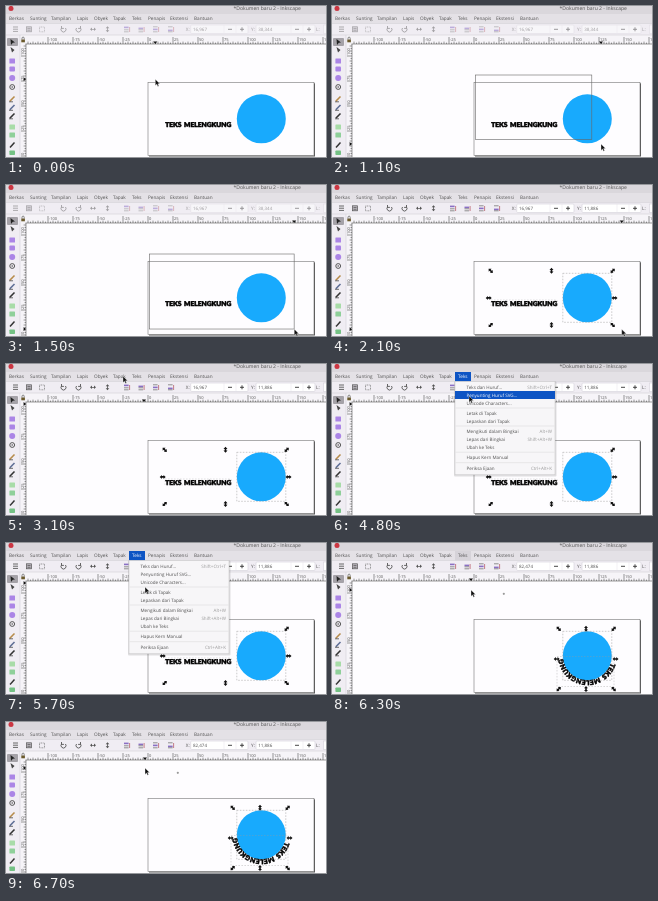
An HTML page for the animation above (7000 ms loop, 320 by 151 pixels).

```html
<!DOCTYPE html>
<html lang="id">
<head>
<meta charset="utf-8">
<title>Teks melengkung</title>
<style>
html, body { margin: 0; width: 100%; height: 100%; overflow: hidden; background: #fff; }
svg { display: block; width: 100vw; height: 100vh; }
text { font-family: "Open Sans", "Noto Sans", sans-serif; font-size: 4.7px; fill: #505050; text-rendering: geometricPrecision; white-space: pre; }
.num { font-size: 4.5px; }
.tick { font-size: 4px; fill: #555; }
.item { font-size: 4.55px; }
.key { font-size: 4.55px; fill: #999; text-anchor: end; }
.art { font-family: Lato, "Open Sans", sans-serif; font-weight: 900; font-size: 6.7px; word-spacing: .9px; fill: #000; stroke: #000; stroke-width: .5; stroke-linejoin: round; }
.dash { fill: none; stroke: #999; stroke-width: .5; stroke-dasharray: 1.6 1.4; }
</style>
</head>
<body>
<svg id="stage" viewBox="0 0 320 151" preserveAspectRatio="none"></svg>
<script>
const NS = 'http://www.w3.org/2000/svg';
const stage = document.getElementById('stage');

function add(parent, tag, attrs = {}, text) {
  const el = document.createElementNS(NS, tag);
  for (const k in attrs) el.setAttribute(k, attrs[k]);
  if (text !== undefined) el.textContent = text;
  return parent.appendChild(el);
}
const group = (parent = stage) => add(parent, 'g');
const rect = (p, x, y, width, height, fill, more) => add(p, 'rect', { x, y, width, height, fill, ...more });
const line = (p, d, stroke = '#555', w = .7, more) =>
  add(p, 'path', { d, stroke, 'stroke-width': w, fill: 'none', ...more });
const shape = (p, d, fill, more) => add(p, 'path', { d, fill, ...more });
const dot = (p, cx, cy, r, fill, more) => add(p, 'circle', { cx, cy, r, fill, ...more });
const label = (p, x, y, str, cls = '', more) => add(p, 'text', { x, y, class: cls, ...more }, str);
const show = (el, on) => el.setAttribute('visibility', on ? 'visible' : 'hidden');
const place = (el, x, y) => el.setAttribute('transform', `translate(${x} ${y})`);

const ACCENT = '#0d54c4';
const SKY = '#18aafd';
const VIOLET = '#ab85e6';

// Canvas, page and artwork
const canvas = group();
rect(canvas, 0, 0, 320, 151, '#fefdff');
rect(canvas, 143, 77.3, 166, 73.2, '#555');
rect(canvas, 142, 76.4, 166, 73.2, '#fefdff', { stroke: '#777', 'stroke-width': .6 });
dot(canvas, 255.3, 112.8, 24.5, SKY);
const flat = group(canvas);
label(flat, 159.2, 120.6, 'TEKS MELENGKUNG', 'art');
const bent = group(canvas);
add(bent, 'path', { id: 'ring', fill: 'none', d: 'M280 112.8A24.5 24.5 0 0 1 231 112.8A24.5 24.5 0 0 1 280 112.8' });
const curved = add(bent, 'text', { class: 'art' });
add(curved, 'textPath', { href: '#ring', startOffset: 7.2 }, 'TEKS MELENGKUNG');
dot(bent, 171.8, 50.8, 1.1, '#999');

function selection(x, y, r, b) {
  const g = group(canvas);
  const arrow = 'M-3 0L-.8-2V-.8H.8V-2L3 0L.8 2V.8H-.8V2Z';
  const mx = (x + r) / 2, my = (y + b) / 2;
  const handle = (hx, hy, turn) =>
    shape(g, arrow, '#111', { transform: `translate(${hx} ${hy}) rotate(${turn})` });
  for (const [hy, tilt] of [[y - 2.5, 45], [b + 2.5, -45]]) {
    handle(x - .3, hy, tilt);
    handle(mx, hy, 90);
    handle(r + .7, hy, -tilt);
  }
  handle(x - 2.3, my, 0);
  handle(r + 2.5, my, 0);
  rect(g, 230.8, 88.3, 49, 49, 'none', { class: 'dash' });
  return g;
}
const flatSel = selection(159, 88.3, 280, 137.5);
rect(flatSel, 159, 115, 66, 6, 'none', { class: 'dash', opacity: .6 });
line(flatSel, 'M192.5 116.5V120', '#333', .6);
const bentSel = selection(227, 88.3, 281, 143.6);
rect(bentSel, 225, 113.5, 57, 30, 'none', { class: 'dash', opacity: .7 });
const band = rect(canvas, 143.5, 69, 0, 0, 'none', { stroke: '#666', 'stroke-width': .6 });

// Rulers, one unit per pixel
const rulers = group();
rect(rulers, 14, 29, 306, 9, '#f6f4f8');
rect(rulers, 14, 29, 6, 122, '#f6f4f8');
line(rulers, 'M19.5 38H320M20 38V151', '#555', .6);
for (let u = -120; u <= 175; u += 2.5) {
  const x = 142 + u, major = u % 25 === 0;
  line(rulers, `M${x} ${major ? 31 : u % 5 ? 36.6 : 35.6}V38`, '#555', .6);
  if (major) label(rulers, x + 1, 35, u, 'tick');
}
for (let u = 0; u <= 110; u += 2.5) {
  const y = 150 - u, major = u % 25 === 0;
  line(rulers, `M${major ? 15 : u % 5 ? 18.6 : 17.6} ${y}H20`, '#555', .6);
  if (major) label(rulers, 0, 0, u, 'tick', { transform: `translate(18 ${y - 1}) rotate(-90)` });
}
rect(rulers, 15.3, 33.5, 3.6, 2.8, '#6b5a2c');
line(rulers, 'M16 33.5V32.2A1.1 1.1 0 0 1 18.2 32.2V33.5', '#444', .6);
const markX = shape(rulers, 'M-2 35.4H2L0 38Z', '#111');
const markY = shape(rulers, 'M17.6-2V2L20 0Z', '#111');

// Tool palette
const tools = group();
rect(tools, 0, 29, 14, 122, '#f0edf3');
line(tools, 'M14 29V151', '#d4d0d8', .6);
rect(tools, 1, 32, 11, 8, '#a5a2a8', { rx: 1 });
shape(tools, 'M4.5 33L9 36.5L6.8 36.8L5 39Z', '#222');
shape(tools, 'M4.5 41L8.5 44L6 46.5Z', '#444');
rect(tools, 3.4, 52.5, 5.6, 5, VIOLET, { rx: .5 });
rect(tools, 3.4, 60.5, 5.6, 5, VIOLET, { rx: 1 });
dot(tools, 6.2, 72, 3, VIOLET);
dot(tools, 6.2, 81, 2.4, 'none', { stroke: '#555', 'stroke-width': 1 });
dot(tools, 6.2, 81, .8, '#555');
for (const [y, tone] of [[93, '#b78b4a'], [101.5, '#5f6f96'], [110, '#333']]) {
  line(tools, `M3.8 ${y + 2.3}L8.5 ${y - 2.5}`, tone, 1.6);
  line(tools, `M3 ${y + 2.8}H7`, '#333', .7);
}
rect(tools, 3.4, 118.5, 5.6, 5, '#a8dca8', { rx: .6 });
rect(tools, 3.4, 126.5, 5.6, 5, '#8fd09a', { rx: .6 });
line(tools, 'M4 141.5L8.5 136.5', '#333', 1.5);
rect(tools, 3.4, 144.5, 5.6, 4.5, '#74c184', { rx: .8 });

// Header bars
const head = group();
rect(head, 0, 0, 320, 8, '#dad7dc');
rect(head, 0, 8, 320, 9.5, '#e4e1e6');
rect(head, 0, 17.5, 320, 11.5, '#f0edf3');
line(head, 'M0 17.5H320M0 29H320', '#d2ced6', .6);
dot(head, 5, 2.4, 2.5, '#cb3642');
label(head, 227.5, 4.2, '*Dokumen baru 2 - Inkscape', '', { style: 'font-size:5.05px' });
const hot = rect(head, 123, 8, 16, 9.5, ACCENT);
const bar = { Berkas: 3, Sunting: 24, Tampilan: 45, Lapis: 71, Obyek: 88, Tapak: 107, Teks: 126, Penapis: 142, Ekstensi: 164, Bantuan: 188 };
const entries = {};
for (const name in bar) entries[name] = label(head, bar[name], 14.2, name);

// Tool controls
const icons = group();
line(icons, 'M7 21H12M7 23.2H12M7 25.4H12', '#666', 1);
rect(icons, 20.5, 20.8, 5, 5, '#b9b5bd', { stroke: '#555', 'stroke-width': .7 });
line(icons, 'M21.5 22.5H24.5M21.5 24.3H24.5', '#555', .7);
rect(icons, 33.5, 21, 5, 4.8, 'none', { stroke: '#777', 'stroke-width': .8, 'stroke-dasharray': '.9 .7' });
line(icons, 'M55.5 22A2.5 2.5 0 1 0 59.5 22M55.5 20V22.4H57.9', '#555', .9);
line(icons, 'M74.5 22A2.5 2.5 0 1 1 70.5 22M74.5 20V22.4H72.1', '#555', .9);
const swap = 'M-3 0L-1-1.8V-.4H1V-1.8L3 0L1 1.8V.4H-1V1.8Z';
shape(icons, swap, '#555', { transform: 'translate(87 23.3)' });
shape(icons, swap, '#555', { transform: 'translate(101.5 23.3) rotate(90)' });
[121, 135.5, 150, 165].forEach((x, i) => {
  rect(icons, x - 3, 20.6 + i, 4.6, 1.6, '#8a6fc4');
  line(icons, `M${x - 3} 25.8H${x + 1.6}M${x - 3} ${i < 2 ? 23.8 : 20.8}H${x + 1.6}`, '#777', .8);
  line(icons, `M${x + 2.6} 21V26`, '#c0707c', .9);
});
const fields = group();
function field(name, x, w) {
  label(fields, x - 5, 25, name);
  rect(fields, x, 19, w + 24, 8.5, '#fff', { stroke: '#d6d2da', 'stroke-width': .6, rx: 1 });
  line(fields, `M${x + w} 19V27.5M${x + w + 12} 19V27.5`, '#e4e0e8', .5);
  line(fields, `M${x + w + 4} 23.3h4M${x + w + 16} 23.3h4M${x + w + 18} 21.3v4`, '#333', .9);
  return label(fields, x + 2.3, 25, '', 'num');
}
const valX = field('X:', 184.7, 33.3);
const valY = field('Y:', 250, 35);
label(fields, 310, 25, 'L:');
rect(fields, 317.5, 19, 6, 8.5, '#fff', { stroke: '#d6d2da', 'stroke-width': .6 });

// Drop-down menu
const menu = group();
rect(menu, 122, 17.5, 102.5, 95, '#000', { opacity: .12, rx: 1 });
rect(menu, 123, 17.3, 100, 93.5, '#f7f6f8', { stroke: '#c2c2c2', 'stroke-width': .5 });
const lit = rect(menu, 123, 0, 100, 8, ACCENT);
const rows = [
  [23, 'Teks dan Huruf...', 'Shift+Ctrl+T'], [31, 'Penyunting Huruf SVG...'], [39, 'Unicode Characters...'],
  [49, 'Letak di Tapak'], [57, 'Lepaskan dari Tapak'],
  [67, 'Mengikuti dalam Bingkai', 'Alt+W'], [75, 'Lepas dari Bingkai', 'Shift+Alt+W'], [83, 'Ubah ke Teks'],
  [93.5, 'Hapus Kern Manual'], [104, 'Periksa Ejaan', 'Ctrl+Alt+K']
].map(([y, name, key]) => {
  if (key) label(menu, 220, y + 1.7, key, 'key');
  return { y, el: label(menu, 134.5, y + 1.7, name, 'item') };
});
for (const y of [44, 62, 88.2, 98.7]) line(menu, `M123.5 ${y}H222.5`, '#d6d6d6', .5);

const pointer = shape(stage, 'M0 0V6.4L1.5 5L2.5 7.3L3.6 6.8L2.6 4.6H4.6Z', '#111', { stroke: '#fff', 'stroke-width': .35 });

// Pointer track: time, x, y
const track = [
  [0, 149.3, 73.2], [300, 143, 68.6], [600, 143, 68.6], [700, 147, 71], [800, 166, 83], [900, 208, 108],
  [1000, 246, 127], [1100, 269, 138], [1200, 280, 142], [1400, 288, 144], [2100, 289.7, 144.2], [2400, 289.7, 144.2],
  [2500, 285, 140], [2600, 266, 124], [2700, 223, 88], [2800, 172, 50], [2900, 138, 27], [3000, 121, 15],
  [3100, 117, 12.2], [3500, 117, 12.2], [3600, 119, 14], [3700, 125, 16.5], [3800, 131, 16.5], [3900, 133, 15],
  [4300, 133, 15], [4400, 134, 18], [4800, 137, 32], [5000, 138, 36], [5700, 139, 44], [6100, 139, 47.5], [6600, 139, 46]
];
function at(t) {
  const i = track.findIndex(k => k[0] > t);
  if (i < 0) return track[track.length - 1].slice(1);
  const [a, b] = [track[i - 1], track[i]];
  const f = (t - a[0]) / (b[0] - a[0]);
  return [a[1] + (b[1] - a[1]) * f, a[2] + (b[2] - a[2]) * f];
}

const PICK = 1600, LEAVE = 2900, OPEN = 4300, CLICK = 6300, REST = 6700;

function draw(t) {
  const [x, y] = at(t);
  const picked = t >= PICK, done = t >= CLICK, open = t >= OPEN && !done;
  place(pointer, x, y);

  // Rulers only follow the pointer over the canvas
  const [mx, my] = done ? [x, y] : at(Math.min(t, LEAVE));
  place(markX, mx, 0);
  place(markY, 0, Math.max(40, my));

  const [bx, by] = at(Math.max(0, t - 40));
  show(band, t >= 700 && !picked);
  band.setAttribute('width', Math.max(0, bx - 143.5));
  band.setAttribute('height', Math.max(0, by - 69));

  show(flat, !done);
  show(bent, done);
  show(flatSel, picked && !done);
  show(bentSel, done);
  icons.setAttribute('opacity', picked ? 1 : .5);
  fields.setAttribute('opacity', picked ? 1 : .5);
  valX.textContent = done ? '82,474' : '16,967';
  valY.textContent = picked ? '11,886' : '38,344';

  show(menu, open);
  show(hot, t >= OPEN && t < REST);
  hot.setAttribute('fill', open ? ACCENT : '#d6d3d9');
  entries.Teks.style.fill = open ? '#fff' : '';
  const row = open && rows.find(r => Math.abs(y - r.y) < 4);
  show(lit, !!row);
  if (row) lit.setAttribute('y', row.y - 4);
  for (const r of rows) r.el.style.fill = r === row ? '#fff' : '';
}

const start = performance.now();
function tick(now) {
  const t = Math.max(0, now - start) % 7000;
  draw(Math.floor(t / 100) * 100);
  requestAnimationFrame(tick);
}
draw(0);
requestAnimationFrame(tick);
</script>
</body>
</html>
```
